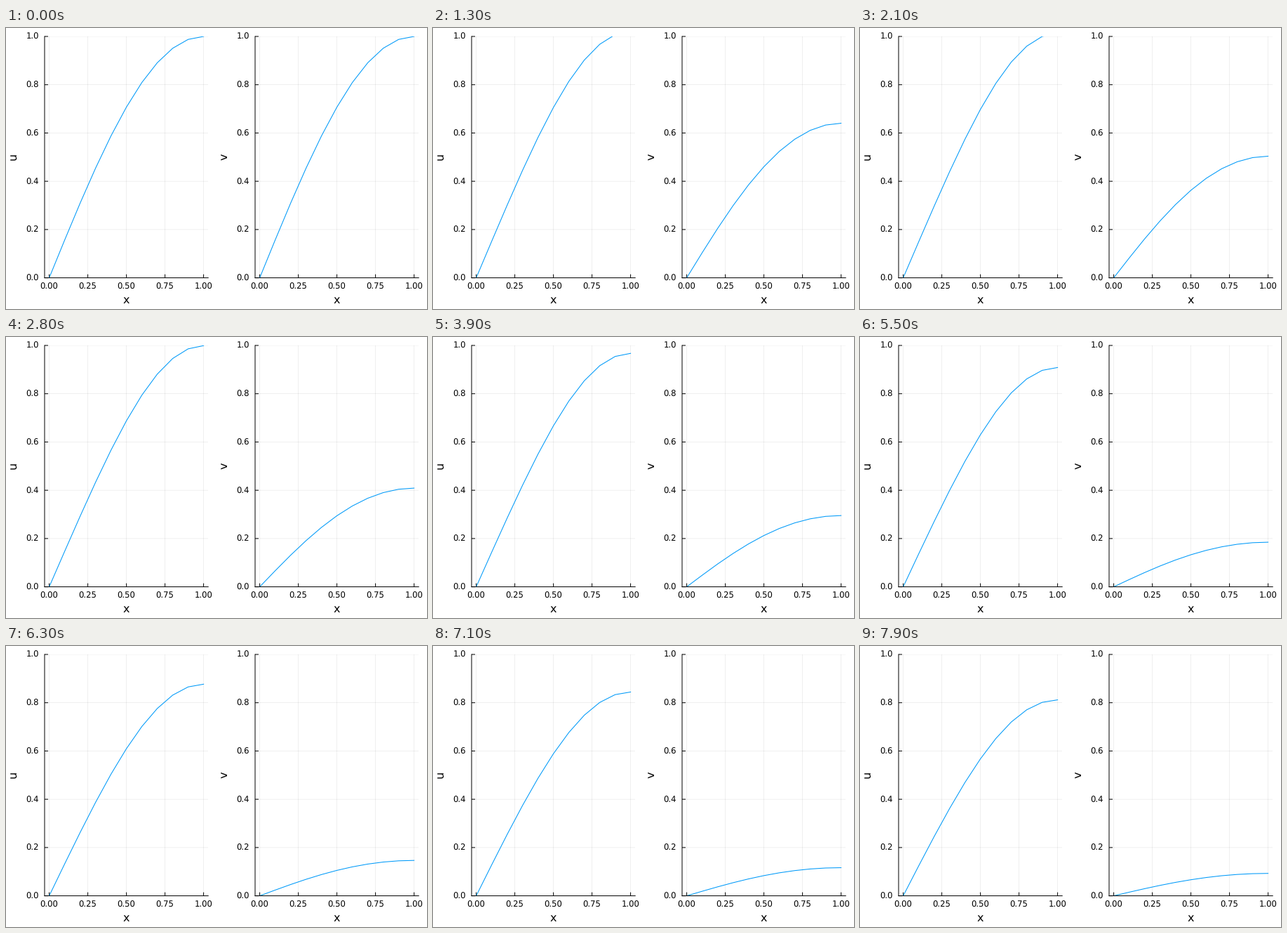
These frames come from a looping animation (600x400 px, 8 s). A matplotlib script:

```python
import numpy as np
import matplotlib.pyplot as plt
from matplotlib.animation import FuncAnimation

W, H, DPI = 600, 400, 100
FRAMES, INTERVAL = 80, 100
PT = 72 / DPI  # one pixel in points

# Reaction-diffusion pair on [0, 1]: u(0) = 0, u'(1) = 0, same for v
#   u_t = DU u_xx + u v,   v_t = DV v_xx - u v
DU, DV, DX = 0.25, 1.0, 0.1
x = np.linspace(0, 1, 11)


def with_ends(y):
    """Add the fixed left end and the zero-slope right end."""
    right = (4 * y[:, -1] - y[:, -2]) / 3
    return np.column_stack([np.zeros(2), y, right])


def rhs(y):
    lap = np.diff(with_ends(y), 2, axis=1) / DX**2
    uv = y[0] * y[1]
    return np.array([DU * lap[0] + uv, DV * lap[1] - uv])


def rk4(y, h):
    k1 = rhs(y)
    k2 = rhs(y + h / 2 * k1)
    k3 = rhs(y + h / 2 * k2)
    k4 = rhs(y + h * k3)
    return y + h / 6 * (k1 + 2 * k2 + 2 * k3 + k4)


def model_time(i):
    """Steady steps after a slightly faster start."""
    return 0.00901 * i + 0.0146 * (1 - np.exp(-i / 1.5))


def solve(count, substeps=8):
    y = np.tile(np.sin(np.pi * x[1:-1] / 2), (2, 1))
    states = [with_ends(y)]
    for dt in np.diff(model_time(np.arange(count))):
        for _ in range(substeps):
            y = rk4(y, dt / substeps)
        states.append(with_ends(y))
    return states


states = solve(FRAMES)

plt.rcParams.update({"font.family": "DejaVu Sans", "path.snap": False,
                     "text.hinting": "no_hinting"})
fig = plt.figure(figsize=(W / DPI, H / DPI), dpi=DPI, facecolor="white")

TOP, BOTTOM, WIDTH, TICK = 12, 355.6, 233.2, 5
HEIGHT = BOTTOM - TOP
XT, YT = np.linspace(0, 1, 5), np.linspace(0, 1, 6)
X0, X1 = -0.03, 1.03


def label(px, py, s, size, **kw):
    fig.text(px / W, 1 - py / H, s, fontsize=size * PT, va="baseline", **kw)


def panel(left, name):
    ax = fig.add_axes([left / W, 1 - BOTTOM / H, WIDTH / W, HEIGHT / H])
    ax.set(xlim=(X0, X1), ylim=(0, 1), xticks=XT, yticks=YT)
    ax.set_facecolor("none")
    ax.set_axisbelow(True)
    ax.grid(color="black", alpha=0.1, lw=0.6 * PT)
    ax.spines[["top", "right"]].set_visible(False)
    ax.spines[["left", "bottom"]].set_linewidth(PT)
    ax.tick_params(length=0, labelleft=False, labelbottom=False)

    ink = dict(color="black", lw=PT, clip_on=False)
    ax.vlines(XT, 0, TICK / HEIGHT, **ink)
    ax.hlines(YT, X0, X0 + TICK * (X1 - X0) / WIDTH, **ink)
    for t in XT:
        label(left + WIDTH * (t - X0) / (X1 - X0), 372, f"{t:.2f}", 11.65,
              ha="center")
    for t in YT:
        label(left - 8, BOTTOM - t * HEIGHT + 4.3, f"{t:.1f}", 11.65,
              ha="right")
    label(left + WIDTH / 2, 391.6, "x", 16, ha="center")
    label(left - 39.2, TOP + HEIGHT / 2 - 1, name, 16, ha="center",
          rotation=90, rotation_mode="anchor")
    return ax.plot([], [], color="#009AF9", lw=1.05 * PT)[0]


curves = [panel(55, "u"), panel(355, "v")]


def update(i):
    for curve, y in zip(curves, states[i]):
        curve.set_data(x, y)
    return curves


anim = FuncAnimation(fig, update, frames=FRAMES, interval=INTERVAL,
                     init_func=lambda: update(0), repeat=True, repeat_delay=0)
plt.show()
```
